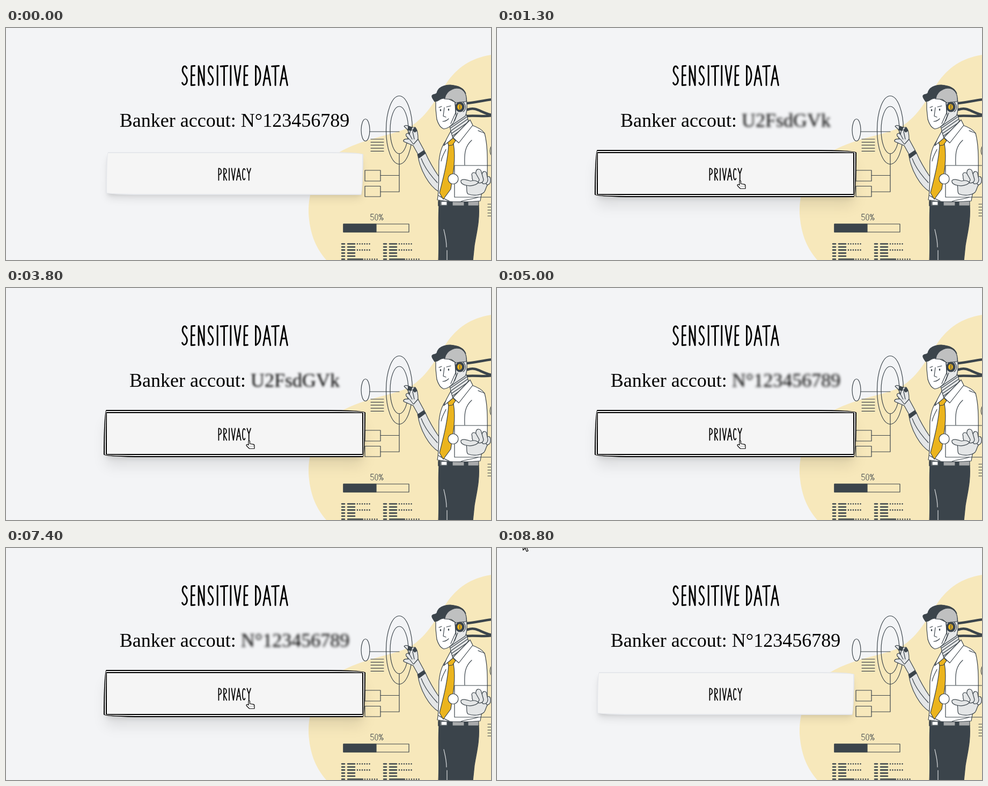
These frames come from a looping animation (904x432 px, 9100 ms). An HTML page:

```html
<!DOCTYPE html>
<html lang="en">
<head>
<meta charset="utf-8">
<title>Sensitive data</title>
<style>
  html, body { margin: 0; width: 100%; height: 100%; overflow: hidden; background: #f3f4f6; }
  #stage { position: relative; width: 904px; height: 432px; overflow: hidden; }
  svg { position: absolute; left: 0; top: 0; }
  #account {
    position: absolute; left: 0; top: 152px; width: 852px; margin: 0;
    font: 36px/40px "Liberation Serif", "Times New Roman", serif;
    color: #000; text-align: center; white-space: nowrap;
  }
  #button {
    position: absolute; box-sizing: border-box;
    left: 186px; top: 231px; width: 480px; height: 80px;
    background: #f5f5f5; border: 2px solid #e5e7eb;
    border-radius: 15px 225px 15px 225px / 255px 15px 255px 15px;
  }
  #button.focus { left: 182px; top: 227px; width: 488px; height: 88px; border: 6px double #000; }
  .ink { fill: none; stroke: #000; stroke-width: 2.9; stroke-linecap: round; stroke-linejoin: round; }
  #art { stroke: #3b444b; stroke-width: 1.2; stroke-linejoin: round; stroke-linecap: round; }
  .none { fill: none; }
  .dark { fill: #3b444b; }
  .white { fill: #fff; }
  .pale { fill: #e4e6e7; }
  .gold { fill: #ebb41e; }
  .cable { fill: none; stroke-width: 4.5; }
  .pointer { fill: #fff; stroke: #000; stroke-width: 1.2; stroke-linejoin: round; }
</style>
</head>
<body>
<div id="stage">
  <svg width="904" height="432" viewBox="0 0 904 432">
    <path fill="#f7e8bb" d="M904 50C866 56 840 74 820 104C800 134 784 166 750 186C714 201 662 207 620 232C582 256 563 300 564 345C566 380 576 408 597 432H904Z"/>
    <g id="art">
      <!-- diagram -->
      <g class="none">
        <ellipse cx="733" cy="190" rx="24.5" ry="63.5"/>
        <ellipse cx="733" cy="190" rx="17" ry="44"/>
        <ellipse cx="670" cy="190" rx="8" ry="20.5" fill="#f3f4f6"/>
        <path d="M678 193H733M733 234V305M698 274.5H733M698 305H733"/>
        <path d="M669 265H698V285H669ZM669 294.500H698V314H669Z"/>
        <path id="notes"/>
        <path d="M904 221C902 226 902 232 904 236"/>
      </g>
      <g class="none" stroke-width="1" transform="translate(679 346.500)" aria-label="50%">
        <path d="M6 0H1V5C4 4 6.500 5 6.500 8C6.500 12 1 12 .5 9.500M9 3C9 -1 14 -1 14 3V8.500C14 12.500 9 12.500 9 8.500ZM22.500 0L17.500 11.500"/>
        <ellipse cx="18" cy="2.500" rx="1.500" ry="2.300"/>
        <ellipse cx="22.300" cy="9" rx="1.500" ry="2.300"/>
      </g>
      <path class="none" d="M629 365H751V380H629Z"/>
      <path class="dark" d="M629 365H690V380H629Z"/>
      <g id="dashes" class="none" stroke-width="2.600"></g>

      <!-- cables -->
      <path class="cable" d="M860 140C875 139 888 135 906 133M860 152C878 146 884 158 906 162M858 164C876 162 890 166 906 163"/>

      <!-- raised arm -->
      <path class="pale" d="M768 239C772 264 788 294 807 305V277C798 264 788 247 781 231Z"/>
      <path class="none" d="M774 243C780 260 790 273 804 288"/>
      <path class="pale" d="M742 183C744 180 750 182 755 185L763 185C767 190 768 199 768 207L780 229L769 237L759 219C753 216 746 214 741 211C740 207 746 206 751 207L746 201C744 196 749 195 752 198L749 190Z"/>
      <path class="none" d="M755 185L752 198L757 207M763 188L758 193L761 207M748 190L757 190M752 207L759 216M768 207L760 216"/>
      <path class="dark" d="M750 183L757 185L755 191L749 190ZM762 185L766 191L762 194L758 190Z"/>
      <path class="dark" d="M767 236L779 228L782 233L770 242Z"/>

      <!-- trousers and belt -->
      <path class="dark" d="M807 330H881C883 360 877 380 873 405L870 434H806C808 395 805 370 807 330Z"/>
      <path fill="none" stroke="#d9dcde" d="M816 375C818 385 821 393 821 408M822 414V432"/>
      <path fill="#a9abac" d="M806 322H881V331H806Z"/>
      <path class="dark" d="M823 322H832V331H823ZM854 322H861V331H854ZM806 322H809V331H806Z"/>
      <path class="white" d="M811 323H822V330H811Z"/>

      <!-- shirt -->
      <path class="white" d="M828 201C814 214 809 228 807 248C806 278 808 300 804 320C828 325 860 324 884 322L886 310L897 290C897 254 899 222 892 196C886 188 878 184 868 181L848 190Z"/>
      <path class="none" d="M868 209C856 220 854 232 855 255M880 191C884 193 888 194 892 196M820 226C816 235 813 238 811 248M806 312C815 317 820 320 826 322M848 323C858 319 870 319 880 315"/>
      <path class="gold" d="M825 218L834 215C839 242 833 274 829 300L815 319L808 307C815 279 823 250 825 218Z"/>
      <path class="gold" d="M822 209L833 204L838 210L832 218L825 219Z"/>

      <!-- neck and collar -->
      <path class="pale" d="M827 181L858 161L862 173L837 205L831 204Z"/>
      <path class="none" d="M829 186L858 166M830 191L860 170M831 196L859 177M832 201L851 188"/>
      <path class="white" d="M829 192L821 207L816 219L826 211L833 205Z"/>
      <path class="white" d="M865 171L870 181L844 214L833 204Z"/>

      <!-- head -->
      <path class="pale" d="M832 135L858 130C860 145 859 158 856 164L828 183Z"/>
      <path class="white" d="M801 132V151L803 170C806 180 810 186 816 188C824 187 830 182 834 176L839 164L837 138L818 129Z"/>
      <path fill="#bfc0c0" d="M817 132C819 118 832 108 848 113C856 118 859 127 858 137L838 139L830 133Z"/>
      <path class="dark" d="M799 137C797 133 793 130 794 126C796 122 800 125 803 121C805 111 816 106 828 106C842 107 853 111 857 122C850 111 840 110 832 114C823 118 819 124 818 131C812 130 808 134 804 136Z"/>
      <path class="none" d="M807 148L812 146M821 147L829 145M817 148L815 164L820 166M814 174C819 174 822 172 825 169M837 139L838 158L829 178M842 158L836 173"/>
      <g class="dark" stroke="none"><ellipse cx="810" cy="153" rx="1.300" ry="2"/><ellipse cx="825" cy="152" rx="1.300" ry="2"/></g>
      <ellipse class="dark" cx="846" cy="147" rx="8" ry="9"/>
      <ellipse class="gold" cx="845.500" cy="147" rx="5" ry="6"/>
      <path class="none" d="M846 143V151M852 138C858 144 858 152 852 156"/>

      <!-- puzzle card and hand -->
      <path class="none" d="M906 256H836V315H906"/>
      <circle class="white" cx="833.500" cy="281" r="9.500"/>
      <path class="pale" d="M858 292C860 299 857 305 861 309C870 313 884 312 891 306C895 301 894 295 899 291L896 283L872 284Z"/>
      <path class="pale" d="M896 292C892 286 896 281 897 278C899 275 903 277 903 281C904 287 902 292 896 292Z"/>
      <path class="pale" d="M889 290C883 283 887 275 888 270C890 265 896 267 896 272L898 282C898 288 894 291 889 290Z"/>
      <path class="pale" d="M879 288C873 281 876 272 876 267C878 261 885 262 886 268L890 282C890 287 885 290 879 288Z"/>
      <path class="pale" d="M872 286C867 282 870 277 868 273C869 268 875 268 877 273L882 282C882 287 877 289 872 286Z"/>
      <path class="pale" d="M848 284C851 280 859 283 866 285C872 283 877 284 881 288C875 293 866 295 858 293C852 292 847 289 848 284Z"/>
    </g>
    <g id="heading" class="ink" transform="translate(327 69)" role="img" aria-label="SENSITIVE DATA"></g>
  </svg>

  <p id="account">Banker accout: <span id="secret">N°123456789</span></p>
  <div id="button"></div>

  <svg width="904" height="432" viewBox="0 0 904 432">
    <g id="label" class="ink" transform="translate(395.500 260.500) scale(.61)" role="img" aria-label="PRIVACY"></g>
    <g id="arrow" class="pointer">
      <path d="M0 0V17L4 13.300L6.800 19.500L9.500 18.300L6.800 12.300H12Z"/>
    </g>
    <g id="hand" class="pointer">
      <path d="M-1.500 9V2C-1.500 .3 1 .3 1 2V6.500L7.500 7.700C9.300 8 9.500 9 9.500 10.500V15.500H0L-5 10.500C-6.500 8 -4 7 -1.500 9Z"/>
      <path fill="none" stroke-dasharray="1 2" d="M1 11H8"/>
    </g>
  </svg>
</div>

<script>
const LOOP = 9100, STEP = 100;
const PLAIN = 'N°123456789', CIPHER = 'U2FsdGVk';
const $ = id => document.getElementById(id);
const clamp = p => Math.max(0, Math.min(1, p));
const mix = (a, b, p) => a + (b - a) * p;
const easeOut = p => 1 - (1 - p) ** 2;
const easeInOut = p => p * p * (3 - 2 * p);

// Hand-lettered capitals: [width, centre line], 39 units tall
const GLYPHS = {
  S: [12, 'M10 6C8 1 3 0 2 9C2 18 10 19 10.500 28C10 36 4 40 1.500 33'],
  E: [9, 'M8 1.500L2 2L1.500 37.500L8 37M2 19H7.500'],
  N: [13, 'M1.500 37.500V2L11.500 37.500V1.500'],
  I: [4, 'M2 1.500V37.500'],
  T: [11, 'M-1 2.500L12 1.500M5.500 2V37.500'],
  V: [12, 'M.5 1.500L6 37.500L11.500 1.500'],
  D: [12, 'M1.500 1.500V37.500C13.500 32 12.500 5 1.500 1.500'],
  A: [11, 'M-1 37.500L5.500 1.500L12 37.500M1.500 25H9.500'],
  P: [11, 'M1.500 37.500V1.500C11.500 1 12.500 19 1.500 21'],
  R: [11, 'M1.500 37.500V1.500C11.500 1 12.500 17 1.500 19L10 37.500'],
  C: [10, 'M9 6C7 0 1.500 0 1.500 19C1.500 39 7 39 9 32'],
  Y: [12, 'M.5 1.500L6 18L11.500 1.500M6 18V37.500'],
  ' ': [3, '']
};

function letter(group, text) {
  let x = 0;
  group.innerHTML = [...text].map(c => {
    const [width, d] = GLYPHS[c];
    const path = `<path transform="translate(${x} 0)" d="${d}"/>`;
    x += width + 4.8;
    return path;
  }).join('');
}

function drawDetails() {
  let notes = '';
  for (let i = 0; i < 5; i++) notes += `M680 ${207 + i * 5.6}H704M898 ${328 + i * 5.5}H904`;
  $('notes').setAttribute('d', notes);

  let bars = '', dots = '';
  for (const x of [626, 704]) {
    for (let row = 0; row < 6; row++) {
      const y = 402 + row * 5.7;
      bars += `M${x} ${y}h5M${x + 11} ${y}h${row === 5 ? 28 : 13}`;
      if (row === 0 || row === 2) dots += `M${x + 29} ${y}h23`;
      if (row === 5) dots += `M${x + 43} ${y}h23`;
    }
  }
  $('dashes').innerHTML = `<path d="${bars}"/><path stroke-dasharray="0 4.500" d="${dots}"/>`;
}

// Button presses: [time, text shown, final blur, fade length]
const PRESSES = [
  [900, CIPHER, 1, 300], [2200, PLAIN, 0, 200],
  [3700, CIPHER, 1, 200], [5000, PLAIN, 0, 200],
  [6200, CIPHER, 1, 300], [7400, PLAIN, 0, 200]
];

function drawSecret(t) {
  const press = PRESSES.filter(p => p[0] <= t).pop();
  let text = PLAIN, blur = 0;
  if (press) {
    const [start, shown, goal, length] = press;
    text = shown;
    blur = 2.6 * mix(1 - goal, goal, easeOut(clamp((t - start) / length)));
  }
  $('secret').textContent = text;
  $('secret').style.filter = blur ? `blur(${blur}px)` : 'none';
}

function drawButton(t) {
  const lift = t < 8500 ? easeOut(clamp((t - 200) / 400)) : 0;
  const shadow = (...layer) => {
    const [y, soft, spread] = layer.map(([low, high]) => mix(low, high, lift));
    return `0 ${y}px ${soft}px ${spread}px rgba(0,0,0,.1)`;
  };
  $('button').className = t >= 900 && t < 8500 ? 'focus' : '';
  $('button').style.boxShadow =
    shadow([10, 20], [15, 25], [-3, -5]) + ',' + shadow([4, 8], [6, 10], [-4, -6]);
}

function drawPointer(t) {
  const enter = easeOut(clamp((t - 200) / 400));
  const leave = easeInOut(clamp((t - 7600) / 700));
  const exit = clamp((t - 8600) / 200);
  const x = mix(mix(456, 453.5, enter), 50.5, leave) - 2 * exit;
  const y = mix(mix(323, 283.5, enter), -6, leave) - 7 * exit;
  const over = y > 231 && y < 311;
  for (const [id, on] of [['hand', over], ['arrow', !over]]) {
    $(id).setAttribute('transform', `translate(${x} ${y})`);
    $(id).style.display = on && t >= 200 ? '' : 'none';
  }
}

function draw(t) {
  drawSecret(t);
  drawButton(t);
  drawPointer(t);
}

letter($('heading'), 'SENSITIVE DATA');
letter($('label'), 'PRIVACY');
drawDetails();

const start = performance.now();
function tick() {
  const t = (performance.now() - start) % LOOP;
  draw(Math.floor(t / STEP) * STEP);
  requestAnimationFrame(tick);
}
tick();
</script>
</body>
</html>
```
